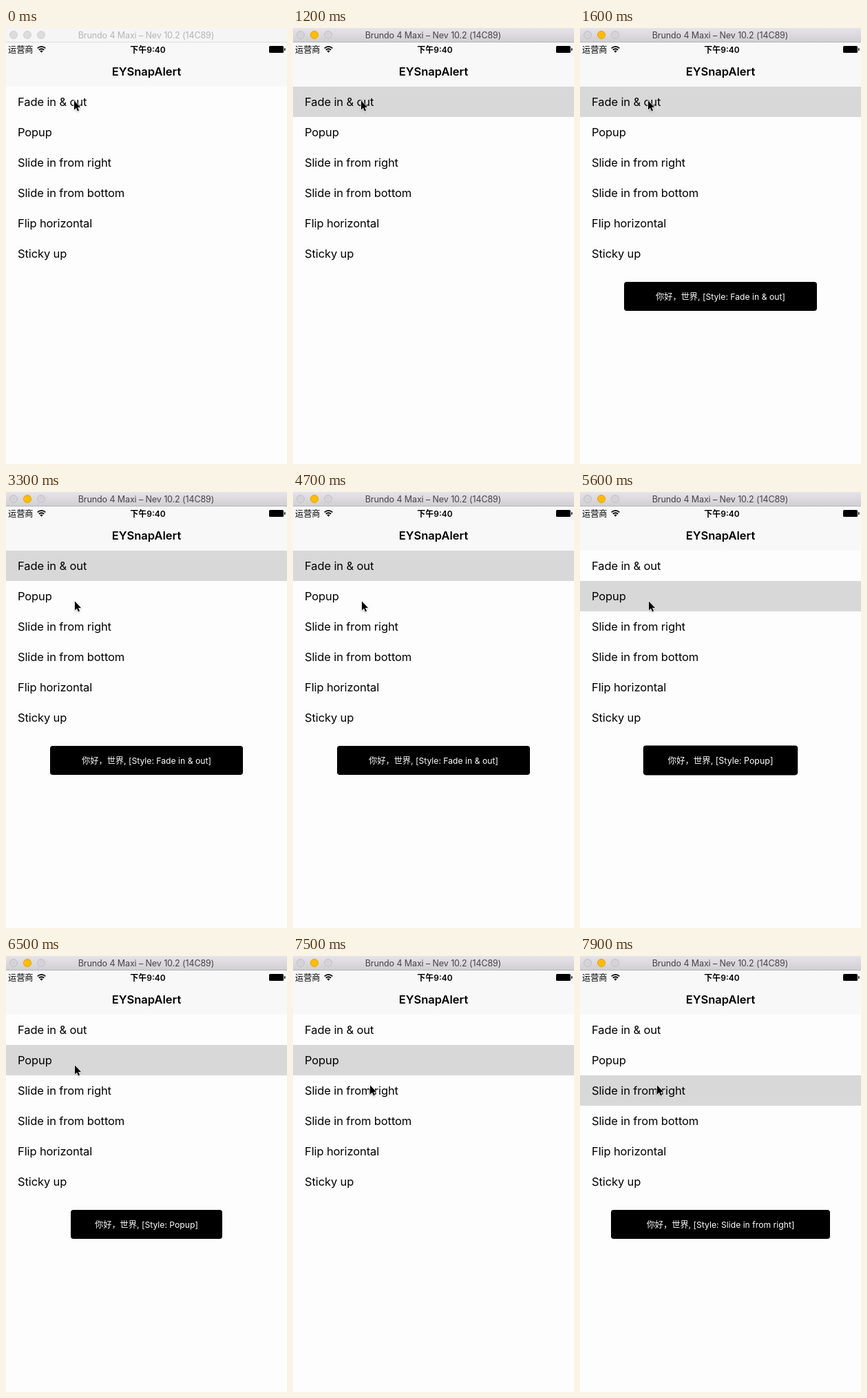
An HTML page for the animation above (8000 ms loop, 408 px wide and 632 px high).

```html
<!DOCTYPE html>
<html lang="zh-Hans">
<head>
<meta charset="utf-8">
<title>EYSnapAlert</title>
<style>
  html, body { margin: 0; width: 100%; height: 100%; overflow: hidden; background: #fdfdfd; }
  svg { display: block; font-family: Inter, "Noto Sans CJK SC", "Noto Sans CJK", sans-serif; }
  .center { text-anchor: middle; }
  #rows { font-size: 16.5px; letter-spacing: -.11px; }
  #title { font-size: 12.5px; letter-spacing: -.1px; }
</style>
</head>
<body>
<svg width="408" height="632" viewBox="0 0 408 632">
  <defs>
    <linearGradient id="active" x2="0" y2="1">
      <stop stop-color="#e6e4e8"/><stop offset="1" stop-color="#d1cfd3"/>
    </linearGradient>
  </defs>
  <rect width="408" height="632" fill="#fdfdfd"/>
  <rect y="20" width="408" height="65" fill="#f8f8f8"/>

  <rect id="bar" width="408" height="20"/>
  <rect id="edge" y="20" width="408" height="1"/>
  <g id="lights" stroke-width="1">
    <circle cx="11" cy="10" r="5.5"/>
    <circle id="yellow" cx="31" cy="10" r="5.5"/>
    <circle cx="51" cy="10" r="5.5"/>
  </g>
  <text id="title" class="center" x="203.5" y="15">Brundo 4 Maxi – Nev 10.2 (14C89)</text>

  <text x="3" y="35.5" font-size="12.2">运营商</text>
  <g fill="none" stroke="#000" stroke-width="1.8">
    <path d="M45.7 29.4Q51.5 24.4 57.3 29.4M47.8 31.8Q51.5 28.6 55.2 31.8"/>
    <path d="M49.3 33.2Q51.5 31.6 53.7 33.2L51.5 35.8Z" fill="#000" stroke="none"/>
  </g>
  <text class="center" x="206" y="35.5" font-size="12" font-weight="600">下午9:40</text>
  <rect x="382" y="26" width="21" height="10" rx="1.5"/>
  <rect x="404" y="29" width="1.5" height="4" rx=".7"/>
  <text class="center" x="204" y="69" font-size="16.5" font-weight="600">EYSnapAlert</text>

  <rect id="highlight" width="408" height="44" fill="#d8d8d8"/>
  <g id="rows"></g>
  <g id="alert">
    <rect id="box" y="-21" height="42" rx="4"/>
    <text id="message" class="center" y="4.5" font-size="12.2" fill="#fff"></text>
  </g>
  <path id="cursor" d="M0 0V13L3 10.2 5 15 7 14.1 5 9.4H9Z"
    stroke="#fff" stroke-width="1.2" paint-order="stroke"
    style="filter:drop-shadow(0 1px 1px #8888)"/>
</svg>
<script>
const LOOP = 8000, STEP = 100;
const styles = ["Fade in & out", "Popup", "Slide in from right",
  "Slide in from bottom", "Flip horizontal", "Sticky up"];
const boxWidths = [280, 220, 318];
const el = id => document.getElementById(id);
const set = (id, attrs) => {
  for (const name in attrs) el(id).setAttribute(name, attrs[name]);
};

styles.forEach((label, i) => {
  const text = document.createElementNS("http://www.w3.org/2000/svg", "text");
  text.setAttribute("x", 17);
  text.setAttribute("y", 113 + 44 * i);
  text.textContent = label;
  el("rows").append(text);
});

const progress = (t, from, to) => Math.min(1, Math.max(0, (t - from) / (to - from)));
const smooth = p => p * p * (3 - 2 * p);
const easeOut = p => 1 - (1 - p) ** 3;

// Linear interpolation through [time, value] points
function track(t, points) {
  let value = points[0][1];
  for (let i = 1; i < points.length; i++) {
    value += (points[i][1] - points[i - 1][1]) * progress(t, points[i - 1][0], points[i][0]);
  }
  return value;
}

function drawWindow(active) {
  set("bar", { fill: active ? "url(#active)" : "#f5f5f5" });
  set("edge", { fill: active ? "#b8b6ba" : "#dcdcdc" });
  set("lights", { fill: active ? "#d5d3d7" : "#dcdcdc", stroke: active ? "#c2c0c4" : "#d0d0d0" });
  set("yellow", active ? { fill: "#ffbd0a", stroke: "#e0a010" } : { fill: "#dcdcdc", stroke: "#d0d0d0" });
  set("title", { fill: active ? "#444" : "#b4b4b4" });
}

function drawAlert(t, row) {
  let x = 204, scale = 1, opacity = 1;
  if (row === 0) {
    opacity = smooth(progress(t, 1200, 1500)) * (1 - smooth(progress(t, 4800, 5100)));
  } else if (row === 1) {
    scale = track(t, [[5200, 0], [5400, 1], [5500, 1.1], [5600, 1.02], [5700, 1]]);
    opacity = 1 - smooth(progress(t, 6900, 7200));
  } else if (row === 2) {
    x += 370 * (1 - easeOut(progress(t, 7600, 7900)));
  } else {
    opacity = 0;
  }
  set("alert", { transform: `translate(${x} 389) scale(${scale})`, opacity });
  if (row < 0) return;
  set("box", { x: -boxWidths[row] / 2, width: boxWidths[row] });
  el("message").textContent = `你好，世界, [Style: ${styles[row]}]`;
}

function draw(now) {
  const t = Math.floor(now % LOOP / STEP) * STEP;
  const row = t < 1100 ? -1 : t < 5200 ? 0 : t < 7600 ? 1 : 2;
  drawWindow(t >= 1000);
  set("highlight", { y: 85 + 44 * row, opacity: row < 0 ? 0 : 1 });
  drawAlert(t, row);

  const first = smooth(progress(t, 2300, 2600));
  const second = smooth(progress(t, 7200, 7500));
  const x = 99 + first + 12 * second;
  const y = 105.5 + 53 * first + 29 * second;
  set("cursor", { transform: `translate(${x} ${y})` });
  requestAnimationFrame(() => draw(performance.now() - start));
}
const start = performance.now();
draw(0);
</script>
</body>
</html>
```
